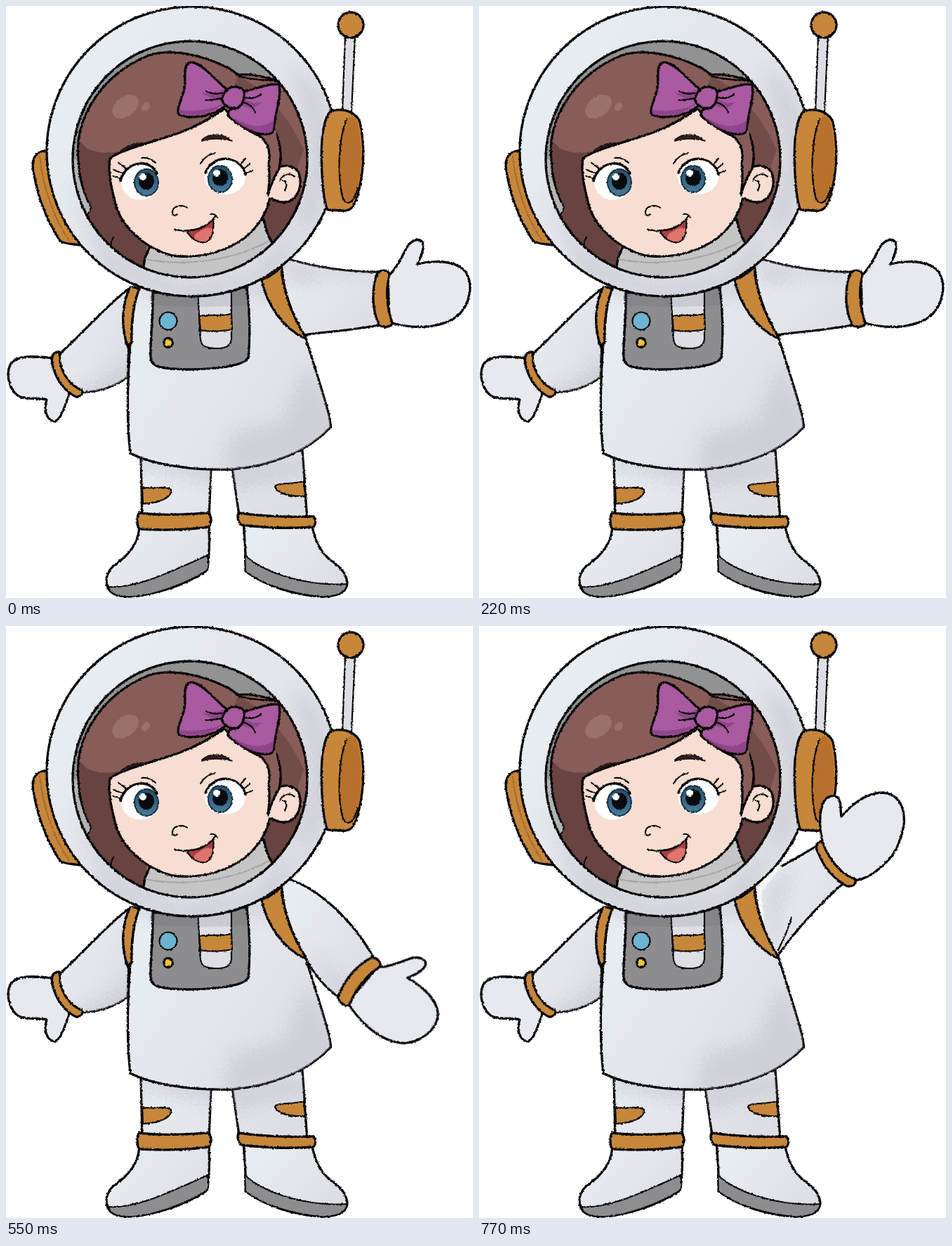
These frames come from a looping animation (665x842 px, 0.88 s). An HTML page:

```html
<!DOCTYPE html>
<html lang="en">
<head>
<meta charset="utf-8">
<title>Waving astronaut</title>
<style>
  html, body { margin: 0; width: 100%; height: 100%; overflow: hidden; background: #fff; }
  svg { display: block; width: 100%; height: 100%; }
  .ink { stroke: #080607; stroke-width: 3.3; stroke-linecap: round; stroke-linejoin: round; }
  .line { fill: none; }
  .thin { stroke-width: 2.2; }
  .suit { fill: url(#suit); }
  .glove { fill: #e6eaef; }
  .orange { fill: #c6873b; }
  .gray { fill: #8d8d8f; }
  .hair { fill: #885d59; }
  .skin { fill: #f8ded2; }
  .bow { fill: #a95aa0; }
  .shade { fill: #bdbcc8; opacity: .45; filter: url(#chalk); }
</style>
</head>
<body>
<svg viewBox="0 0 665 842">
  <defs>
    <linearGradient id="suit" x2="1" y2=".7">
      <stop offset=".2" stop-color="#e8edf1"/>
      <stop offset="1" stop-color="#dddee4"/>
    </linearGradient>
    <linearGradient id="iris" x2="0" y2="1">
      <stop stop-color="#254d67"/>
      <stop offset="1" stop-color="#477d9c"/>
    </linearGradient>
    <filter id="rough" filterUnits="userSpaceOnUse" x="0" y="0" width="665" height="842" color-interpolation-filters="sRGB">
      <feTurbulence type="fractalNoise" baseFrequency=".35" numOctaves="2" seed="4"/>
      <feDisplacementMap in="SourceGraphic" scale="3" xChannelSelector="R" yChannelSelector="G"/>
    </filter>
    <filter id="chalk" filterUnits="userSpaceOnUse" x="0" y="0" width="665" height="842" color-interpolation-filters="sRGB">
      <feTurbulence type="fractalNoise" baseFrequency=".3" numOctaves="3" seed="9" result="grain"/>
      <feGaussianBlur in="SourceGraphic" stdDeviation="11"/>
      <feDisplacementMap in2="grain" scale="30" xChannelSelector="R" yChannelSelector="G"/>
    </filter>
    <path id="torso" d="M188 398C178 440 168 560 177 636C205 651 260 661 322 659C380 654 432 632 462 599C464 588 446 535 426 470C405 436 394 402 392 365Z"/>
    <path id="legs" d="M192 640L194 732H289L292 655ZM322 655L333 732H429L422 632Z"/>
    <path id="sleeve" d="M178 400C150 419 110 465 72 499C74 520 88 538 102 550C135 549 155 541 173 528Z"/>
    <path id="armOut" d="M392 357C440 372 490 379 536 378V453C490 462 455 463 423 468L380 420Z"/>
    <path id="armUp" d="M392 372C420 354 455 331 488 308L522 364C500 380 450 432 425 470L400 430Z"/>
    <path id="armDown" d="M392 357C440 368 492 415 525 474L474 528C455 515 440 498 425 470L380 420Z"/>
    <path id="ring" fill-rule="evenodd" d="M58 207A207 206 0 1 1 472 207A207 206 0 1 1 58 207ZM95 218A167 168 0 1 0 429 218A167 168 0 1 0 95 218Z"/>
    <g id="hand">
      <path class="ink glove" d="M544 384C555 375 562 360 570 345C576 333 588 329 593 336C596 347 590 358 586 367C605 362 641 360 655 379C667 399 659 424 645 439C620 460 580 460 546 450Z"/>
      <path class="ink orange" d="M529 379C537 374 546 376 546 383C540 405 543 430 550 451C549 457 537 458 531 454C521 430 520 402 529 379Z"/>
    </g>
    <clipPath id="inTorso"><use href="#torso"/></clipPath>
    <clipPath id="inLegs"><use href="#legs"/></clipPath>
    <clipPath id="inSleeve"><use href="#sleeve"/></clipPath>
    <clipPath id="inArmOut"><use href="#armOut"/></clipPath>
    <clipPath id="inArmUp"><use href="#armUp"/></clipPath>
    <clipPath id="inArmDown"><use href="#armDown"/></clipPath>
    <clipPath id="inRing"><use href="#ring" clip-rule="evenodd"/></clipPath>
    <clipPath id="visor"><ellipse cx="262" cy="218" rx="167" ry="168"/></clipPath>
  </defs>

  <g filter="url(#rough)">
    <!-- antenna and headphones -->
    <path class="ink thin" fill="#dcdee3" d="M483 42L497 42L492 150H479Z"/>
    <circle class="ink orange" cx="491" cy="27" r="18"/>
    <path class="ink orange" d="M64 206C47 204 38 212 38 227C42 263 56 302 77 334C84 339 94 338 106 340Z"/>
    <path class="line" stroke="#a9692a" stroke-width="2" d="M48 213C52 255 67 300 90 334"/>

    <!-- legs and boots -->
    <use href="#legs" class="suit ink"/>
    <g clip-path="url(#inLegs)"><path class="shade" d="M180 640H440V662L330 690L290 680L180 658Z"/></g>
    <path class="ink orange thin" d="M194 685C208 687 229 682 235 688C236 701 215 707 195 708ZM424 676C406 681 385 677 383 684C387 693 402 698 426 697Z"/>
    <path class="ink suit" d="M190 734C191 762 176 780 155 795C143 804 140 818 146 829C152 840 170 842 195 838C232 831 264 818 286 803C290 787 290 765 289 734Z"/>
    <path class="ink gray thin" d="M146 826C185 829 234 805 287 781C289 792 288 800 285 804C258 820 215 838 180 840C157 841 147 836 146 826Z"/>
    <path class="ink suit" d="M338 733C341 770 342 790 341 804C370 825 410 838 450 840C475 839 486 831 486 820C484 804 472 795 462 788C445 775 438 756 435 733Z"/>
    <path class="ink gray thin" d="M340 781C368 807 430 826 486 822C484 836 470 841 447 840C408 836 366 824 341 804Z"/>
    <path class="ink orange" d="M189 721C222 725 256 723 289 721C293 727 293 735 289 741C258 745 224 746 190 744C186 738 186 728 189 721ZM331 721C365 726 402 727 438 726C442 731 441 737 438 741C402 744 368 742 335 738C330 733 329 727 331 721Z"/>

    <!-- resting arm -->
    <path class="ink glove" d="M70 501C46 499 16 494 6 510C-1 525 5 546 18 555C31 561 45 556 58 560C53 575 58 588 68 591C79 589 83 570 90 552Z"/>
    <use href="#sleeve" class="suit ink"/>
    <g clip-path="url(#inSleeve)"><path class="shade" d="M180 495C155 528 125 543 95 543L110 565L190 550Z"/></g>
    <path class="ink orange" d="M76 492C67 491 64 499 66 510C71 531 84 549 100 556C107 556 111 550 107 546C91 539 81 524 77 507Z"/>
  </g>

  <g filter="url(#rough)" id="poseOut">
    <use href="#armOut" class="suit ink"/>
    <g clip-path="url(#inArmOut)"><path class="shade" d="M385 350L440 366L530 376V382L450 386L425 400L400 395Z"/></g>
    <use href="#hand"/>
  </g>

  <g filter="url(#rough)" id="poseDown">
    <use href="#armDown" class="suit ink"/>
    <g clip-path="url(#inArmDown)"><path class="shade" d="M425 455L474 528L490 512L450 475Z"/></g>
    <use href="#hand" transform="rotate(42 405 415)"/>
  </g>

  <g filter="url(#rough)">
    <use href="#torso" class="suit ink"/>
    <g clip-path="url(#inTorso)">
      <path class="shade" d="M430 510L475 600L440 640L310 670L320 610L395 590Z"/>
      <path class="shade" d="M180 390H400V415L290 410L190 415Z"/>
    </g>
  </g>

  <g filter="url(#rough)">
    <!-- strap and chest panel -->
    <path class="ink orange" d="M177 399C164 425 164 456 173 484L179 478C178 446 182 421 190 402Z"/>
    <path class="ink gray" d="M209 408C210 440 205 475 206 501C208 513 217 516 260 517C304 516 341 511 345 500C348 470 347 435 343 400Z"/>
    <path class="ink thin" fill="#dedfe5" d="M273 405L277 474C278 484 285 487 300 487C315 487 322 482 321 470V402Z"/>
    <path class="ink orange thin" d="M275 441C290 438 305 442 321 438L322 460C305 463 290 464 277 461Z"/>
    <circle class="ink thin" fill="#6cb4cf" cx="231" cy="448" r="12.5"/>
    <circle class="ink" fill="#f5c638" cx="231" cy="479" r="6.5"/>
    <path d="M205 400H345V425Q275 431 207 425Z" fill="#555563" opacity=".15"/>
  </g>

  <g filter="url(#rough)">
    <!-- inside the visor -->
    <g clip-path="url(#visor)">
      <rect x="90" y="45" width="345" height="345" fill="#929293"/>
      <path fill="#b3b4b5" d="M90 215L103 220C105 250 111 275 121 282C122 292 116 297 110 303L90 270Z"/>
      <path class="ink hair" d="M205 400C165 360 135 335 112 303C116 297 122 292 121 284C111 270 104 245 103 216C101 195 104 175 114 153C132 115 164 85 204 70C238 59 284 72 312 86C324 91 327 95 329 98C350 95 382 103 398 113L450 145V400Z"/>
      <path fill="#65413f" opacity=".9" d="M104 190C120 216 155 214 215 190L150 216C147 250 164 305 200 340L196 385C150 352 125 325 114 303C116 297 122 292 121 284C108 260 103 225 104 190ZM374 275L425 265L400 355L380 345L364 312Z"/>
      <path fill="#65413f" opacity=".6" d="M330 100C360 112 400 150 424 204L410 245L386 220C396 180 360 145 310 150Z"/>
      <g fill="#9a716b">
        <ellipse cx="170" cy="143" rx="21" ry="14" transform="rotate(-38 170 143)"/>
        <ellipse cx="199" cy="143" rx="5" ry="7" transform="rotate(35 199 143)"/>
      </g>
      <path class="line ink thin" d="M332 100C350 106 372 104 392 108M153 329C148 337 149 344 154 348"/>
      <path class="ink" fill="#c5c5c6" d="M205 342L198 358L194 382Q270 410 370 370L384 341C374 334 371 320 367 304Z"/>
      <path class="line" stroke="#a3a3a5" stroke-width="2" d="M199 360C250 371 325 363 376 333"/>

      <!-- face -->
      <path class="ink skin" d="M384 234C392 223 411 226 417 238C423 254 416 272 403 278C392 281 381 277 374 270Z"/>
      <path class="ink skin" d="M148 217C165 203 216 192 245 181C273 171 293 158 312 146C323 162 342 177 360 184C374 194 386 222 376 252C380 278 367 307 340 330C311 350 278 360 237 355C196 344 165 314 156 282C149 254 145 234 148 217Z"/>
      <path class="skin" d="M368 245L386 236L389 274L370 272Z"/>
      <path class="ink hair" d="M312 146C324 164 344 178 361 184C374 195 377 208 374 225C376 240 375 254 373 269C377 254 383 241 389 231C394 208 390 180 370 160Z"/>
      <path class="hair" d="M309 144L325 125L380 155L386 190L361 176Z"/>
      <path class="line ink thin" d="M390 248C395 238 405 237 411 243M393 248C400 248 401 256 397 262"/>

      <!-- eyes -->
      <ellipse cx="191" cy="250" rx="27" ry="26" fill="#fff"/>
      <ellipse cx="312" cy="243" rx="29" ry="25" fill="#fff"/>
      <g id="eye">
        <ellipse cx="200" cy="251" rx="17" ry="19" fill="url(#iris)" stroke="#162f40" stroke-width="2"/>
        <ellipse cx="200" cy="249" rx="11" ry="12" fill="#080b10"/>
        <circle cx="195" cy="243" r="5" fill="#fff"/>
      </g>
      <use href="#eye" x="105" y="-5"/>
      <path class="line ink" d="M163 249C167 233 180 223 195 224C205 225 211 230 215 238M284 237C290 222 305 215 319 218C332 222 339 230 341 240"/>
      <path class="line ink thin" d="M164 245L153 242M166 238L153 233M171 231L160 223M341 238L351 234M338 232L347 225M333 226L341 217M193 216C201 215 208 218 213 223M277 224C281 217 288 211 298 209"/>
      <path fill="#2f1e1e" d="M163 206C172 199 184 194 196 195C185 198 174 202 166 207ZM279 190C291 180 311 181 322 192C309 188 291 188 279 192Z" stroke="#191011" stroke-width="1.5" stroke-linejoin="round"/>

      <!-- nose and mouth -->
      <path class="line ink thin" d="M258 287C251 281 238 285 237 292C236 297 240 300 244 296"/>
      <path class="ink thin" fill="#a83e42" d="M257 319C264 333 278 340 288 334C295 327 296 314 295 303C285 314 272 320 257 319Z"/>
      <path fill="#df746e" d="M267 329C270 321 285 313 294 317C293 325 290 332 286 334C279 337 272 334 267 329Z"/>
      <path class="line ink thin" d="M240 318C263 323 287 316 297 300M291 296C295 295 299 297 301 301"/>
    </g>

    <!-- bow -->
    <path class="ink bow" d="M313 117C296 104 281 82 264 80C250 82 257 101 254 117C251 134 242 144 246 155C266 162 297 156 314 141ZM336 122C355 119 374 109 388 112C394 122 383 151 381 177C377 189 343 180 318 158C313 150 320 146 330 141Z"/>
    <path fill="#833d80" opacity=".7" d="M312 118C295 125 285 125 278 122C289 132 300 134 309 134ZM247 148C270 151 292 147 309 139C295 154 270 158 247 154ZM336 128C345 138 355 139 364 137C357 147 344 146 335 140ZM320 157C345 172 365 176 382 162L380 178C370 186 335 177 320 157Z"/>
    <path class="ink bow" d="M316 118C324 112 337 116 339 121C340 135 335 145 325 146C313 144 309 139 307 133C309 126 312 121 316 118Z"/>
    <path class="line ink thin" d="M307 124C299 126 291 124 285 121M306 131C298 134 291 133 285 134M340 130C350 133 356 130 363 126M338 137C347 139 352 145 355 151"/>

    <use href="#ring" class="suit"/>
    <g clip-path="url(#inRing)">
      <path class="shade" d="M405 90L440 110L475 210L430 320L415 300L437 220L425 150ZM90 250L150 345L250 395L350 383L410 320L390 385L270 422L140 385Z"/>
    </g>
    <use href="#ring" class="ink line"/>
    <path class="ink orange" d="M464 149C480 145 498 150 504 165C510 193 511 225 503 260C498 286 490 293 478 291L458 290C449 270 447 200 452 175C455 160 458 152 464 149Z"/>
    <path fill="#b8712c" d="M485 161C475 184 470 239 480 275C489 287 498 277 501 258C508 225 507 192 501 167C497 155 490 154 485 161Z"/>
    <path class="line ink thin" d="M485 161C475 184 470 239 480 275C489 287 497 275 501 258"/>
  </g>

  <g filter="url(#rough)" id="poseUp">
    <path class="suit" d="M402 380L428 344L488 308L522 364C500 380 450 432 425 470L408 440Z"/>
    <g clip-path="url(#inArmUp)"><path class="shade" d="M405 375L445 340L450 352L428 405L425 470L410 430Z"/></g>
    <path class="line ink" d="M432 341C452 330 470 320 488 308M522 364C500 380 450 432 425 470"/>
    <path class="line ink thin" d="M445 415C440 432 432 449 426 461"/>
    <path class="ink glove" d="M490 310C485 290 484 270 489 255C492 243 503 239 511 244C517 252 514 261 516 271C530 255 550 237 575 237C599 239 607 260 605 283C600 310 590 330 570 345C558 356 545 361 534 362C512 362 493 342 486 314Z"/>
    <path class="ink orange" d="M487 306C479 309 479 317 484 325C492 345 508 362 524 370C532 372 538 366 536 360C518 355 500 335 490 310Z"/>
  </g>

  <path class="ink orange" filter="url(#rough)" d="M364 389C371 425 395 458 424 472L426 470C405 436 394 402 392 371C384 379 374 386 364 389Z"/>
</svg>

<script>
  const STEP = 110;
  const [out, down, up] = ['poseOut', 'poseDown', 'poseUp'].map(id => document.getElementById(id));
  const swing = [out, down, out, up];
  const start = performance.now();

  function draw(now) {
    const step = Math.floor(Math.max(0, now - start) / STEP);
    const current = swing[step % swing.length];
    for (const pose of [out, down, up]) pose.style.display = pose === current ? '' : 'none';
    requestAnimationFrame(draw);
  }
  draw(start);
</script>
</body>
</html>
```
